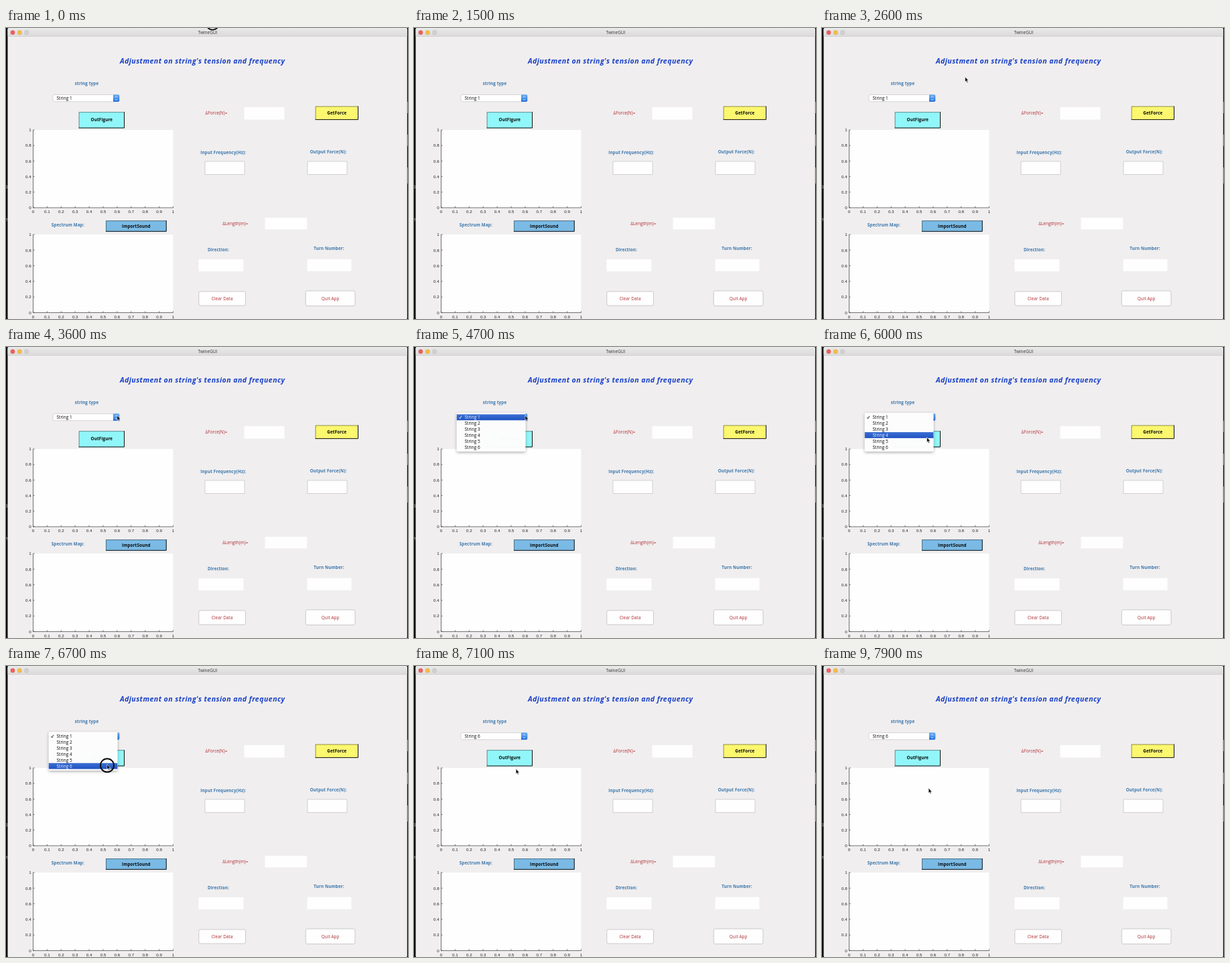
An HTML page that plays this animation: 600 px wide and 434 px high, repeating every 8 s.

```html
<!DOCTYPE html>
<html lang="en">
<head>
<meta charset="utf-8">
<title>String tension</title>
<style>
html, body { margin: 0; width: 100%; height: 100%; overflow: hidden; background: #f0eeef; }
svg { display: block; width: 600px; height: 434px; }
text { font-family: "Open Sans", "Noto Sans", sans-serif; font-size: 6.4px; font-weight: 500; fill: #080808; letter-spacing: .01em; }
.label, .button { font-size: 6.25px; font-weight: 700; letter-spacing: .025em; }
.label { fill: #3a76ab; }
.red { fill: #b02a2f; }
.tick { font-family: "Liberation Sans", sans-serif; font-size: 6.2px; font-weight: 400; fill: #222; letter-spacing: 0; }
.title { font-size: 10.6px; font-weight: 700; font-style: italic; fill: #183fc6; letter-spacing: .042em; }
</style>
</head>
<body>
<svg id="stage" viewBox="0 0 600 434">
  <defs>
    <linearGradient id="bar" x2="0" y2="1">
      <stop stop-color="#e9e8e8"/><stop offset="1" stop-color="#dcdadb"/>
    </linearGradient>
    <linearGradient id="cap" x2="0" y2="1">
      <stop stop-color="#6db0f3"/><stop offset="1" stop-color="#2470dc"/>
    </linearGradient>
    <linearGradient id="selected" x2="0" y2="1">
      <stop stop-color="#3c70d4"/><stop offset="1" stop-color="#1f52c1"/>
    </linearGradient>
    <filter id="shadow" x="-10%" y="-10%" width="120%" height="130%">
      <feDropShadow dx="0" dy="1.5" stdDeviation="2" flood-opacity=".35"/>
    </filter>
  </defs>
</svg>
<script>
const stage = document.getElementById("stage");
const DURATION = 8000, STEP = 100;
const MENU_TOP = 100.6, ROW = 8.87;

function add(tag, attrs, parent = stage) {
  const node = document.createElementNS("http://www.w3.org/2000/svg", tag);
  for (const key in attrs) node.setAttribute(key, attrs[key]);
  parent.appendChild(node);
  return node;
}
const rect = (x, y, width, height, fill, more = {}, parent = stage) =>
  add("rect", { x, y, width, height, fill, ...more }, parent);
const path = (d, stroke, width, parent = stage, fill = "none") =>
  add("path", { d, stroke, "stroke-width": width, fill }, parent);
function text(content, x, y, kind = "", anchor = "start", parent = stage) {
  const node = add("text", { x, y, class: kind, "text-anchor": anchor }, parent);
  node.textContent = content;
  return node;
}

function drawWindow() {
  rect(0, 0, 600, 434, "#0a0a0c");
  rect(2.5, 0, 596.3, 434, "#f0eeef", { rx: 1.5 });
  rect(2.5, 0.4, 596.3, 12, "url(#bar)", { rx: 1.5 });
  rect(2.5, 12, 596.3, 0.6, "#c9c7c8");
  for (const y of [110, 159, 208]) rect(599, y, 1, y > 200 ? 24 : 17, "#4c7fae");
  text("o", -0.7, 239).style.fill = "#ddd";
  text("n", -0.7, 288).style.fill = "#ddd";
  ["#f0605a", "#f3bd45", "#d2d0d1"].forEach((fill, i) =>
    add("circle", { cx: 10 + 10.3 * i, cy: 6.8, r: 3.2, fill, stroke: "#0002", "stroke-width": 0.5 }));
  text("TwineGUI", 301, 9.3, "", "middle").style.fill = "#333";
  text("Adjustment on string's tension and frequency", 293.2, 53.1, "title", "middle");
}

function drawAxes(top, height) {
  const left = 40.5, width = 209, bottom = top + height;
  rect(left, top, width, height, "#fefefe");
  let ticks = `M${left} ${top}V${bottom}H${left + width}`;
  for (let i = 0; i <= 10; i++) {
    const x = left + width * i / 10;
    ticks += `M${x} ${bottom}v-2.2`;
    text(i / 10, x, bottom + 8.2, "tick", "middle");
  }
  for (let i = 0; i <= 5; i++) {
    const y = bottom - height * i / 5;
    ticks += `M${left} ${y}h2.2`;
    text(i / 5, left - 2.8, y + 2.2, "tick", "end");
  }
  path(ticks, "#3b3b3b", 0.7);
}

function drawButton(label, x, y, w, h, fill) {
  rect(x, y, w, h, fill);
  path(`M${x + 0.4} ${y + h}V${y + 0.4}H${x + w}`, "#0008", 0.8);
  path(`M${x} ${y + h - 0.5}H${x + w - 0.5}V${y}`, "#111", 1);
  text(label, x + w / 2, y + h / 2 + 2, "button", "middle");
}

function drawControls() {
  const labels = [
    ["string type", 120.5, 84.8], ["Spectrum Map:", 92.3, 296],
    ["Input Frequency(Hz):", 324.3, 187.6], ["Output Force(N):", 481, 187.4],
    ["Direction:", 317, 333.2], ["Turn Number:", 482, 331]
  ];
  for (const [label, x, y] of labels) text(label, x, y, "label", "middle");
  text("ΔForce(N)=", 314, 129.3, "red", "middle");
  text("ΔLength(m)=", 342.3, 294.4, "red", "middle");

  const fields = [[355.5, 118, 60, 18.7], [386.5, 283, 62.7, 17.5], [287.3, 345, 67.2, 18], [449.6, 344.7, 66, 18]];
  for (const box of fields) rect(...box, "#fefefe");
  for (const x of [297, 450]) rect(x, 199, 59, 19.4, "#fefefe", { stroke: "#c2c0c1", "stroke-width": 0.7 });

  for (const [label, x, y, w, h] of [["Clear Data", 287.8, 393, 69.7, 21], ["Quit App", 447.3, 392, 73.7, 22.6]]) {
    rect(x, y, w, h, "#fefefe", { rx: 2.2, stroke: "#c0bebf", "stroke-width": 0.8 });
    text(label, x + w / 2, y + h / 2 + 2.2, "red", "middle");
  }
  drawButton("OutFigure", 108.7, 125.3, 68.3, 24.2, "#91f6f9");
  drawButton("GetForce", 461.7, 116.7, 64.3, 20.4, "#fbf76f");
  drawButton("ImportSound", 149, 287.2, 90.7, 16.6, "#7abae5");
}

function drawPopup() {
  rect(70, 99.5, 99, 10.3, "#fefefe", { rx: 1.8, stroke: "#c2c0c1", "stroke-width": 0.6 });
  path("M160 99.3h7.2q2 0 2 2v6.7q0 2-2 2h-7.2z", "none", 0, stage, "url(#cap)");
  path("M162.8 103.7l1.8-1.8 1.8 1.8M162.8 105.8l1.8 1.8 1.8-1.8", "#fff", 0.8);
  return text("String 1", 75.5, 107.4);
}

function drawMenu() {
  const group = add("g", {});
  rect(63.8, 98.3, 102.6, 57.4, "#fefefe", { rx: 1.4, filter: "url(#shadow)", "fill-opacity": 0.97 }, group);
  const bar = rect(63.8, 0, 102.6, ROW, "url(#selected)", {}, group);
  const check = path("M67.3 105.2l1.3 1.7 2.2-4", "#111", 0.9, group);
  const items = Array.from({ length: 6 }, (_, i) =>
    text("String " + (i + 1), 75.5, 107.4 + ROW * i, "", "start", group));
  return { group, bar, check, items };
}

drawWindow();
drawAxes(152, 116);
drawAxes(308, 116.5);
drawControls();
const popupText = drawPopup();
const menu = drawMenu();
const ring = add("circle", { r: 10, fill: "none", stroke: "#0a0a0c", "stroke-width": 1.9 });
const pointer = path("M0 0V7.6L1.7 6.1 2.9 8.8 4.2 8.2 3 5.7H5.3Z", "#fff", 0.6, stage, "#0a0a0a");

// time, x, y of the pointer tip
const route = [
  [0, 308, -9], [2000, 308, -9], [2800, 196, 88], [3500, 165.8, 102],
  [4900, 165.8, 102], [5900, 156.4, 134.6], [6100, 156.4, 134.6],
  [6600, 150.7, 146.6], [6900, 150.7, 146.6], [7300, 153.5, 160],
  [7500, 153.5, 160], [7900, 159, 182], [8000, 159, 182]
];
const ease = u => u * u * (3 - 2 * u);
function pointerAt(t) {
  const i = route.findIndex(([time]) => time > t);
  const [t0, x0, y0] = route[i - 1], [t1, x1, y1] = route[i];
  const u = ease((t - t0) / (t1 - t0));
  return [x0 + (x1 - x0) * u, y0 + (y1 - y0) * u];
}
const within = (t, from, to) => t >= from && t < to;
const show = (node, on) => node.setAttribute("display", on ? "inline" : "none");

function render(time) {
  const t = Math.floor((time % DURATION) / STEP) * STEP;
  const [x, y] = pointerAt(t);
  pointer.setAttribute("transform", `translate(${x} ${y})`);
  ring.setAttribute("cx", x + 0.3);
  ring.setAttribute("cy", y + 1.6);
  show(ring, t < 100 || within(t, 4000, 4200) || within(t, 6700, 6900));
  show(menu.group, within(t, 4100, 6900));
  popupText.textContent = t < 6900 ? "String 1" : "String 6";

  const row = Math.max(0, Math.min(5, Math.floor((y - MENU_TOP) / ROW)));
  menu.bar.setAttribute("y", MENU_TOP + row * ROW - 0.2);
  menu.items.forEach((item, i) => { item.style.fill = i === row ? "#f4f7ff" : "#080808"; });
  menu.check.setAttribute("stroke", row === 0 ? "#f4f7ff" : "#111");
}

const start = performance.now();
function loop() {
  render(performance.now() - start);
  requestAnimationFrame(loop);
}
loop();
</script>
</body>
</html>
```
